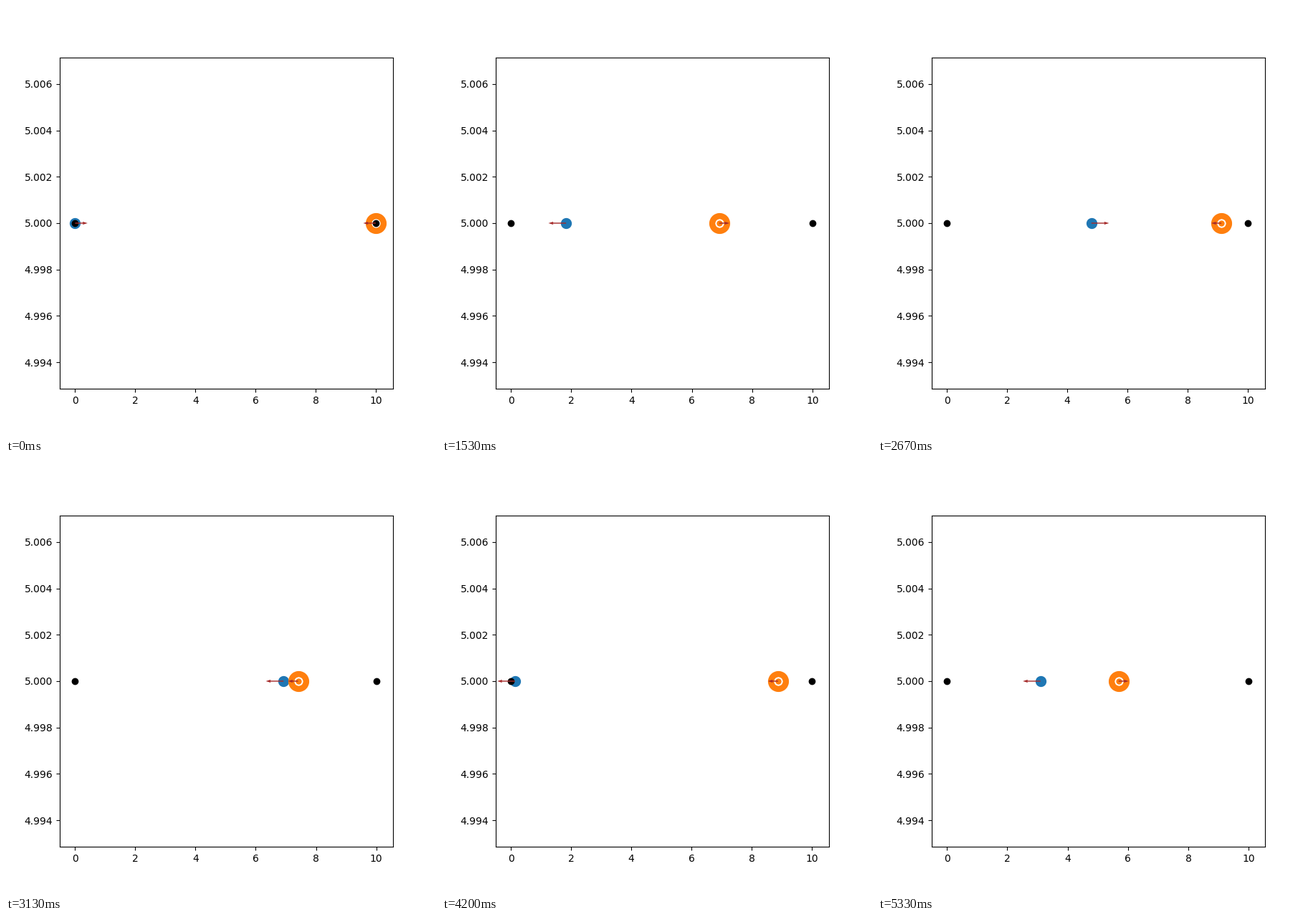
Write a matplotlib script that moves like this. It is 600 by 600 pixels and loops after 5390 ms.

```python
import math

import matplotlib.pyplot as plt
from matplotlib.animation import FuncAnimation

LOOP_MS = 5390
FRAMES = 81
WALLS = (0, 10)
Y = 5
START_SPEED = 0.3
MARGIN = 0.05
MARKER_RADIUS = 3
AXES_W, AXES_H = 465, 462


def track(x, direction, mass, turns):
    """Positions and velocities of a ball that reverses at the given steps."""
    # The first hit shares the kinetic energy evenly between masses 1 and 3.
    speed = START_SPEED * math.sqrt(2 / mass)
    v = direction * START_SPEED
    path = [(x, v)]
    for step in range(1, FRAMES):
        x += v
        path.append((x, v))
        if step in turns:
            v = -math.copysign(speed, v)
    return path


light = track(WALLS[0], 1, 1, (16, 28, 46, 64, 76))
heavy = track(WALLS[1], -1, 3, (16, 36, 47, 58, 78))


def x_limits(light_x, heavy_x):
    """Limits that grow as each marker is added, padded by its radius."""
    lo = hi = light_x
    view = 1
    for x in (light_x, WALLS[0], heavy_x, WALLS[1]):
        pad = MARKER_RADIUS * view / AXES_W
        lo, hi = min(lo, x - pad), max(hi, x + pad)
        view = (1 + 2 * MARGIN) * (hi - lo)
    edge = MARGIN * (hi - lo)
    return lo - edge, hi + edge


fig, ax = plt.subplots(figsize=(6, 6), dpi=100)


def dot(x, color, **style):
    area = (2 * MARKER_RADIUS) ** 2
    return ax.scatter([x], [Y], s=area, color=color, **style)


def arrow(x):
    return ax.quiver([x], [Y], [START_SPEED], [0], color="brown",
                     scale=8, scale_units="width", width=0.003)


light_dot = dot(WALLS[0], "C0", linewidths=5)
dot(WALLS[0], "black")
heavy_dot = dot(WALLS[1], "C1", linewidths=15)
dot(WALLS[1], "black")
balls = ((light, light_dot, arrow(WALLS[0])),
         (heavy, heavy_dot, arrow(WALLS[1])))

half = (1 + 2 * MARGIN) * MARKER_RADIUS / AXES_H
ax.set_ylim(Y - half, Y + half)


def update(n):
    for path, marker, pointer in balls:
        x, v = path[n]
        marker.set_offsets([(x, Y)])
        pointer.set_offsets([(x, Y)])
        pointer.set_UVC([v], [0])
    ax.set_xlim(*x_limits(light[n][0], heavy[n][0]))
    return []


anim = FuncAnimation(fig, update, frames=FRAMES, interval=LOOP_MS / FRAMES,
                     init_func=lambda: update(0), repeat=True, repeat_delay=0)
plt.show()
```
